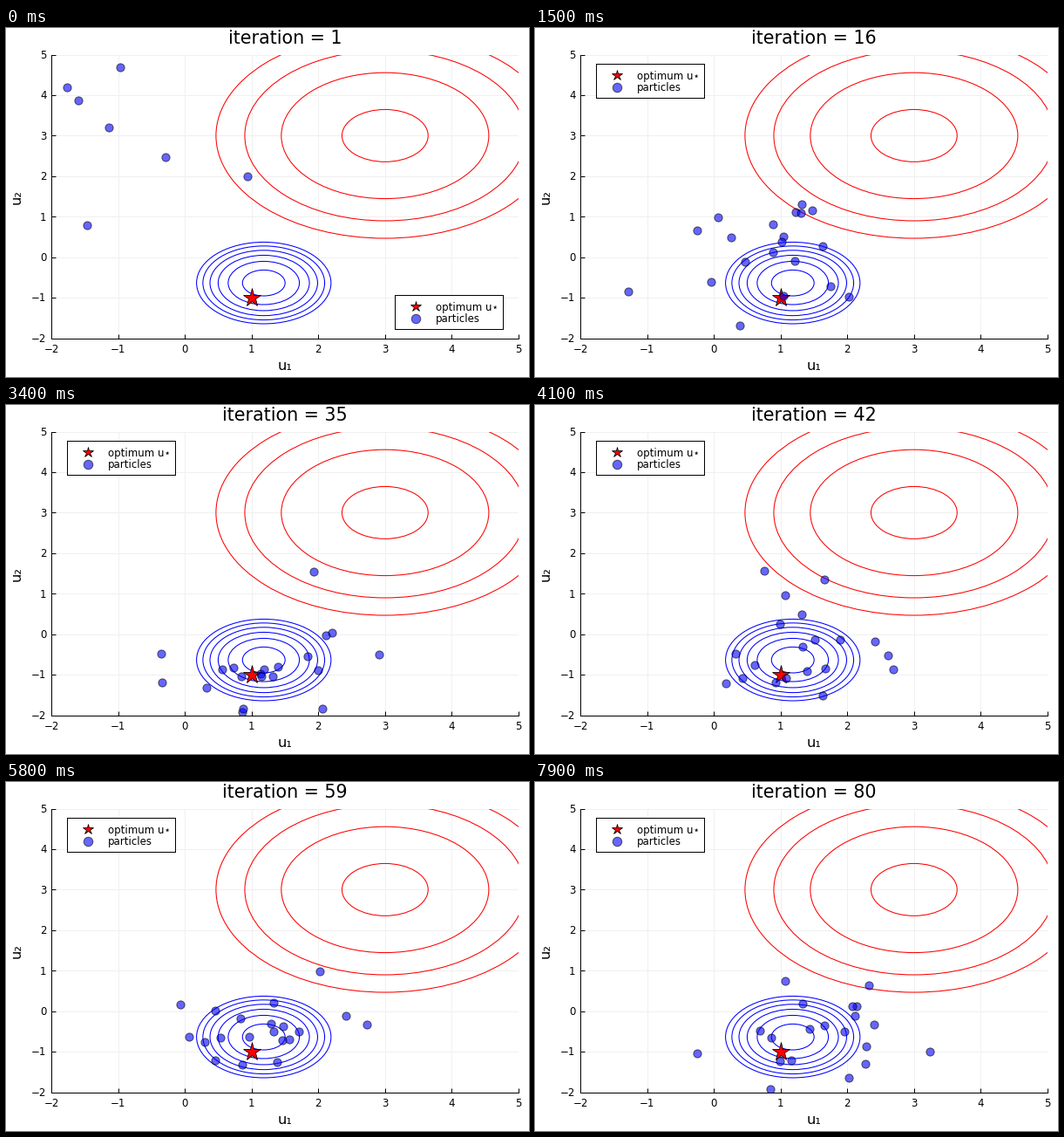
Recreate the animation shown at these times as a matplotlib script. Size 600x400 px, loop 8000 ms.

```python
import numpy as np
import matplotlib.pyplot as plt
from matplotlib.animation import FuncAnimation
from matplotlib.patches import Circle

W, H, DPI = 600, 400, 100
PX = 72 / DPI                       # points per pixel
STEPS, COUNT = 80, 20
LEFT, TOP, RIGHT, BOTTOM = 52, 30.5, 588, 355.6
LO, HI = -2, 5
LEG_W, LEG_H = 124, 39

MEAN = np.array([1.2, -0.35])       # stationary cloud of the sampler
SPREAD = np.array([0.85, 0.75])
KEEP = 0.85                         # correlation from one iteration to the next

START = [(-1.77, 4.19), (-1.59, 3.88), (-1.14, 3.21), (-0.97, 4.69),
         (-0.29, 2.47), (0.94, 2.0), (-1.46, 0.78)]


def first_cloud(rng):
    """The visible starting points plus random ones outside the window."""
    pts = rng.normal((-2.5, 5.5), 2.2, (400, 2))
    outside = (pts[:, 0] < LO - 0.2) | (pts[:, 1] > HI + 0.2)
    return np.vstack([START, pts[outside][:COUNT - len(START)]])


def sample_paths():
    """Noisy relaxation of every particle towards MEAN."""
    rng = np.random.default_rng(4)
    noise = np.sqrt(1 - KEEP**2) * SPREAD
    path = [first_cloud(rng)]
    while len(path) < STEPS:
        kick = noise * rng.normal(size=(COUNT, 2))
        path.append(MEAN + KEEP * (path[-1] - MEAN) + kick)
    return np.array(path)


def box(x0, y0, x1, y1):
    """Pixel box to figure fractions."""
    return [x0 / W, 1 - y1 / H, (x1 - x0) / W, (y1 - y0) / H]


def legend_box(x, y):
    return box(x, y, x + LEG_W, y + LEG_H)


def pixel_axes(rect, width, height, z):
    a = fig.add_axes(rect, zorder=z)
    a.set(xlim=(0, width), ylim=(height, 0), xticks=[], yticks=[])
    return a


def label(a, x, y, text, px, **kw):
    return a.text(x, y, text, fontsize=px * PX, va="baseline", **kw)


def star(a, x, y, px):
    a.plot(x, y, "*", ms=px * PX, mfc="red", mec="black", mew=0.8 * PX)


def dots(a, x, y, px):
    return a.plot(x, y, "o", ms=px * PX, mfc="blue", mec="black",
                  mew=PX, alpha=0.6)[0]


def rings(center, squares, color):
    for sq in squares:
        ax.add_patch(Circle(center, np.sqrt(sq), fill=False, ec=color,
                            lw=1.05 * PX, zorder=1.5))


plt.rcParams["font.family"] = "DejaVu Sans"
fig = plt.figure(figsize=(W / DPI, H / DPI), dpi=DPI, facecolor="white")

ax = fig.add_axes(box(LEFT, TOP, RIGHT, BOTTOM), zorder=1)
ticks = range(LO, HI + 1)
ax.set(xlim=(LO, HI), ylim=(LO, HI), xticks=ticks, yticks=ticks)
ax.set_axisbelow(True)
ax.grid(color="#f0f0f0", lw=PX)
ax.tick_params(direction="in", length=5 * PX, width=PX,
               labelbottom=False, labelleft=False)
for side, spine in ax.spines.items():
    spine.set_linewidth(PX)
    spine.set_visible(side in ("left", "bottom"))

rings((3, 3), 0.416 + 2 * np.arange(4), "red")
rings((1.183, -0.635), 0.102 + 0.1825 * np.arange(6), "blue")
star(ax, 1, -1, 22)
cloud = dots(ax, [], [], 9.2)

page = pixel_axes([0, 0, 1, 1], W, H, 2)
page.axis("off")
for t in ticks:
    name = str(t).replace("-", "\u2212")
    f = (t - LO) / (HI - LO)
    label(page, LEFT + f * (RIGHT - LEFT), 372, name, 11.8, ha="center")
    label(page, 46.5, BOTTOM - f * (BOTTOM - TOP) + 4.3, name, 11.8, ha="right")
label(page, 320, 392, "u\u2081", 16.2, ha="center")
label(page, 17, 193, "u\u2082", 16.2, ha="center", rotation=90,
      rotation_mode="anchor")
title = label(page, 320, 18, "", 20.7, ha="center")

legend = pixel_axes(legend_box(70.2, 40.8), LEG_W, LEG_H, 3)
for spine in legend.spines.values():
    spine.set_linewidth(PX)
star(legend, 24, 13.4, 13)
dots(legend, 24, 27, 10.5)
label(legend, 46.6, 18.2, "optimum u\u22c6", 11.8)
label(legend, 46.6, 31.2, "particles", 11.8)

paths = sample_paths()


def draw(i):
    cloud.set_data(paths[i, :, 0], paths[i, :, 1])
    title.set_text(f"iteration = {i + 1}")
    # The legend moves once the upper left is free
    corner = (446.4, 305.8) if i < 2 else (70.2, 40.8)
    legend.set_position(legend_box(*corner))
    return cloud, title


anim = FuncAnimation(fig, draw, frames=STEPS, interval=100, repeat=True,
                     repeat_delay=0, blit=False)
plt.show()
```
